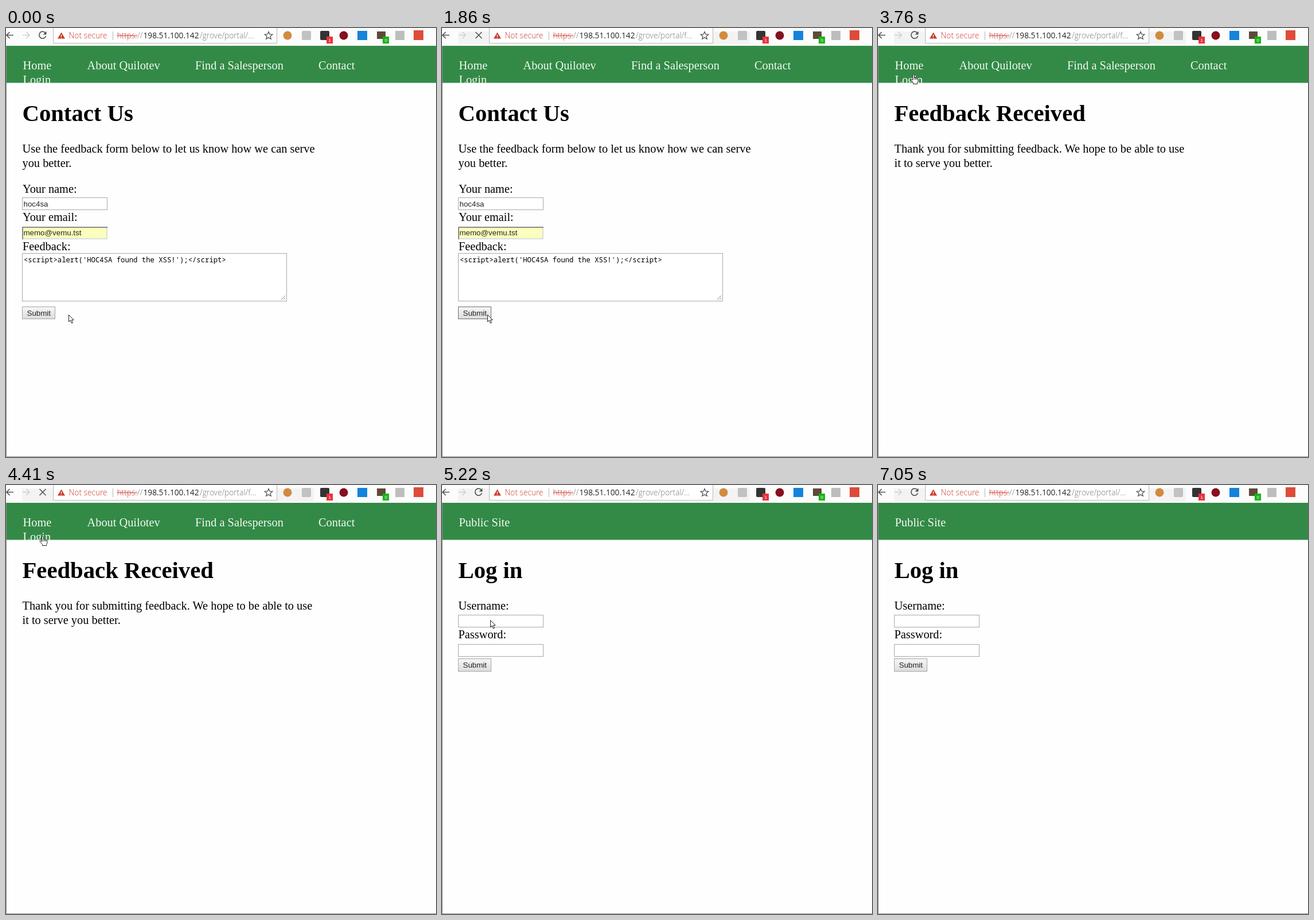
An HTML page that plays this animation: 750 by 747 pixels, repeating every 7300 ms.

```html
<!DOCTYPE html>
<html lang="en">
<head>
<meta charset="utf-8">
<title>Feedback form</title>
<style>
  html, body { margin: 0; width: 100%; height: 100%; overflow: hidden; background: #fefefe; }
  svg { display: block; width: 750px; height: 747px; }
  text { font: 20.36px "Liberation Serif", serif; white-space: pre; }
  .title { font-size: 40.7px; font-weight: bold; }
  .nav text { fill: #f4f8f4; }
  .ui { font: 13.33px "Liberation Sans", sans-serif; fill: #222; }
  .code { font: 12.26px "Noto Sans Mono", "DejaVu Sans Mono", monospace; }
  .url text { font: 300 13.7px "Open Sans", sans-serif; fill: #777; }
  .url .red { fill: #c93a2e; }
  .url .host { font-weight: 400; fill: #222; }
  .badge { font: 8px "Liberation Sans", sans-serif; fill: #fff; }
  .field { fill: #fff; stroke: #a9a9a9; }
  .button rect { fill: url(#face); stroke: #a6a6a6; }
  .button.hover rect { stroke: #707070; }
  .button.down rect { fill: #dcdcdc; stroke: #707070; }
  .line { fill: none; stroke: #555; stroke-width: 1.7; }
  .pointer path { fill: #fff; stroke: #222; stroke-linejoin: round; }
</style>
</head>
<body>
<svg viewBox="0 0 750 747">
  <defs>
    <linearGradient id="face" x2="0" y2="1">
      <stop stop-color="#f6f6f6"/><stop offset="1" stop-color="#dcdcdc"/>
    </linearGradient>
  </defs>

  <!-- browser toolbar -->
  <rect width="750" height="31" fill="#fcfcfc"/>
  <rect id="tintLeft" x="28" y="6" width="54" height="22" fill="#f3f3f3"/>
  <rect id="tintRight" x="473" y="6" width="64" height="22" fill="#f3f3f3"/>
  <path class="line" d="M13 12.5H1M6.500 7L1 12.500L6.500 18"/>
  <path class="line" style="stroke:#d0d0d0" d="M29 12.500H41M35.500 7L41 12.500L35.500 18"/>
  <g id="reload">
    <path class="line" d="M68.500 8.500A6 6 0 1 0 69.500 14"/>
    <path fill="#555" d="M70.500 5.500V11.500H64.500Z"/>
  </g>
  <path id="stop" class="line" d="M58.500 7L69.500 18M69.500 7L58.500 18"/>

  <g class="url">
    <path fill="#fff" stroke="#b8b8b8" d="M82.500 -1V26.500H472.500V-1"/>
    <path fill="#c93a2e" d="M96.500 7.500L103 18.500H90Z"/>
    <path stroke="#fff" stroke-width="1.400" d="M96.500 11.500V15M96.500 16V17.300"/>
    <text class="red" x="109.500" y="18">Not secure</text>
    <path stroke="#b5b5b5" d="M186.500 6V21"/>
    <text class="red" x="193.500" y="18">https:</text>
    <path stroke="#c93a2e" d="M194 13.500H229"/>
    <text x="229" y="18">//</text>
    <text class="host" x="239.500" y="18">198.51.100.142</text>
    <text id="path" x="338" y="18"></text>
    <path class="line" style="stroke-width:1.300" d="M458 6.500L459.900 11L464.800 11.300L461 14.500L462.200 19.200L458 16.600L453.800 19.200L455 14.500L451.200 11.300L456.100 11Z"/>
  </g>

  <!-- extension buttons -->
  <circle cx="491" cy="13" r="7.500" fill="#d28b3e"/>
  <rect x="516" y="5" width="16" height="16" rx="2" fill="#c2c2c2"/>
  <rect x="548" y="5" width="16" height="16" rx="2" fill="#343434"/>
  <rect x="559" y="15" width="11" height="12" fill="#e8323c"/>
  <text class="badge" x="562.500" y="24">1</text>
  <circle cx="589" cy="13" r="7.500" fill="#86101f"/>
  <rect x="613" y="5" width="17" height="16" fill="#1483dc"/>
  <rect x="647" y="6" width="15" height="13" fill="#5d4a38"/>
  <rect x="657" y="15" width="11" height="12" fill="#14b414"/>
  <text class="badge" x="660.500" y="24">0</text>
  <rect x="679" y="5" width="16" height="16" fill="#bdbdbd"/>
  <rect x="711" y="4" width="17" height="17" fill="#dd4b3a"/>

  <!-- page -->
  <rect y="31" width="750" height="65" fill="#338a46"/>
  <g class="nav" id="siteNav">
    <text x="29.500" y="72">Home</text>
    <text x="141.500" y="72">About Quilotev</text>
    <text x="330" y="72">Find a Salesperson</text>
    <text x="545" y="72">Contact</text>
    <text x="29.500" y="96.500">Login</text>
  </g>
  <g class="nav" id="staffNav"><text x="29.500" y="72">Public Site</text></g>
  <rect y="95.500" width="750" height="652" fill="#fefefe"/>

  <g id="contact">
    <text class="title" x="28.500" y="161.500">Contact Us</text>
    <text x="28.500" y="217">Use the feedback form below to let us know how we can serve</text>
    <text x="28.500" y="241.500">you better.</text>
    <text x="29" y="286.500">Your name:</text>
    <rect class="field" x="28.500" y="295.500" width="148" height="21"/>
    <text class="ui" x="30.500" y="311">hoc4sa</text>
    <text x="29" y="336">Your email:</text>
    <rect x="28" y="346" width="149" height="22" fill="#faffbd"/>
    <path fill="none" stroke="#dedede" stroke-width="2" d="M28 367H176V346"/>
    <path fill="none" stroke="#8c8c8c" stroke-width="2" d="M29 368V347H177"/>
    <text class="ui" x="30.500" y="360.500">memo@vemu.tst</text>
    <text x="29" y="386.500">Feedback:</text>
    <rect class="field" x="28.500" y="392.500" width="461" height="83"/>
    <path stroke="#888" d="M480 473L487 466M484 473L487 470"/>
    <text class="code" x="31" y="408">&lt;script&gt;alert('HOC4SA found the XSS!');&lt;/script&gt;</text>
    <g class="button" id="send">
      <rect x="28.500" y="485.500" width="57" height="21"/>
      <text class="ui" x="36.500" y="501">Submit</text>
    </g>
  </g>

  <g id="received">
    <text class="title" x="28.500" y="161.500">Feedback Received</text>
    <text x="28.500" y="217">Thank you for submitting feedback. We hope to be able to use</text>
    <text x="28.500" y="241.500">it to serve you better.</text>
  </g>

  <g id="login">
    <text class="title" x="28.500" y="161.500">Log in</text>
    <text x="28.500" y="217">Username:</text>
    <rect class="field" x="28.500" y="226.500" width="148" height="21"/>
    <text x="28.500" y="267">Password:</text>
    <rect class="field" x="28.500" y="277.500" width="148" height="21"/>
    <g class="button">
      <rect x="28.500" y="302.500" width="57" height="22"/>
      <text class="ui" x="36.500" y="317.500">Submit</text>
    </g>
  </g>

  <path fill="none" stroke="#8e8e8e" d="M.5 31V746.500H750"/>

  <g class="pointer" id="pointer">
    <path id="arrow" d="M.5 .5V12.500L3.300 9.900L5.500 15L7.500 14.200L5.400 9.300H9.200Z"/>
    <path id="hand" d="M4.500 11V2Q4.500 .5 5.700 .5T7 2V6.500Q9 5.500 9.500 7Q11.300 6.200 11.800 7.700Q14 7.200 14 9.500V12.500L12.500 15.500V17.500H5.500V15.500L1.200 10.500Q.5 9 2 8.700Q3.300 9 4.500 11ZM7 7V10M9.500 7V10M11.800 8V10.500"/>
    <path id="beam" style="fill:none" d="M-2.500 -6.500H-.5L.5 -5.500L1.500 -6.500H3.500M.5 -5.500V5.500M-2.500 6.500H-.5L.5 5.500L1.500 6.500H3.500"/>
  </g>
</svg>

<script>
const LOOP = 7300;
const el = id => document.getElementById(id);
const show = (id, on) => el(id).style.display = on ? '' : 'none';

// start time, pointer shape, x, y
const moves = [
  [0, 'arrow', 109, 499], [140, 'arrow', 95, 499], [270, 'arrow', 84, 499], [410, 'arrow', 79, 499],
  [3230, 'arrow', 74, 320], [3350, 'arrow', 59, 131],
  [3500, 'hand', 56, 73], [3760, 'hand', 56, 80], [3910, 'hand', 58, 85], [4050, 'hand', 58, 88],
  [4800, 'arrow', 76, 120], [4950, 'arrow', 96, 156], [5100, 'arrow', 84, 235],
  [5230, 'arrow', 59, 340], [5350, 'arrow', 76, 304],
  [5470, 'beam', 91, 257], [5610, 'beam', 91, 249], [5730, 'beam', 91, 242], [5860, 'beam', 91, 236],
  [6010, 'beam', 91, 235], [6280, 'arrow', 350, 455], [6400, 'arrow', 603, 674],
  [6650, 'arrow', 646, 723], [6800, 'arrow', 680, 734], [6930, 'arrow', 707, 741],
  [7050, 'none', 0, 0]
];

function draw(t) {
  const within = (from, to) => t >= from && t < to;
  const loading = within(1410, 2680) || within(4290, 4800);
  show('stop', loading);
  show('reload', !loading);
  show('tintLeft', t >= 1410);
  show('tintRight', t >= 1860);
  el('path').textContent = '/grove/portal/' + (within(1860, 4530) ? 'f...' : '...');

  show('contact', t < 2550);
  show('received', within(2550, 4680));
  show('login', t >= 4680);
  show('siteNav', t < 4680);
  show('staffNav', t >= 4680);
  el('send').setAttribute('class', 'button' + (t >= 270 ? ' hover' : '') + (within(1130, 1410) ? ' down' : ''));

  const [, shape, x, y] = moves.findLast(m => m[0] <= t);
  for (const s of ['arrow', 'hand', 'beam']) show(s, s === shape);
  el('pointer').setAttribute('transform', `translate(${x} ${y})`);
}

function tick() {
  draw(performance.now() % LOOP);
  requestAnimationFrame(tick);
}
tick();
</script>
</body>
</html>
```
